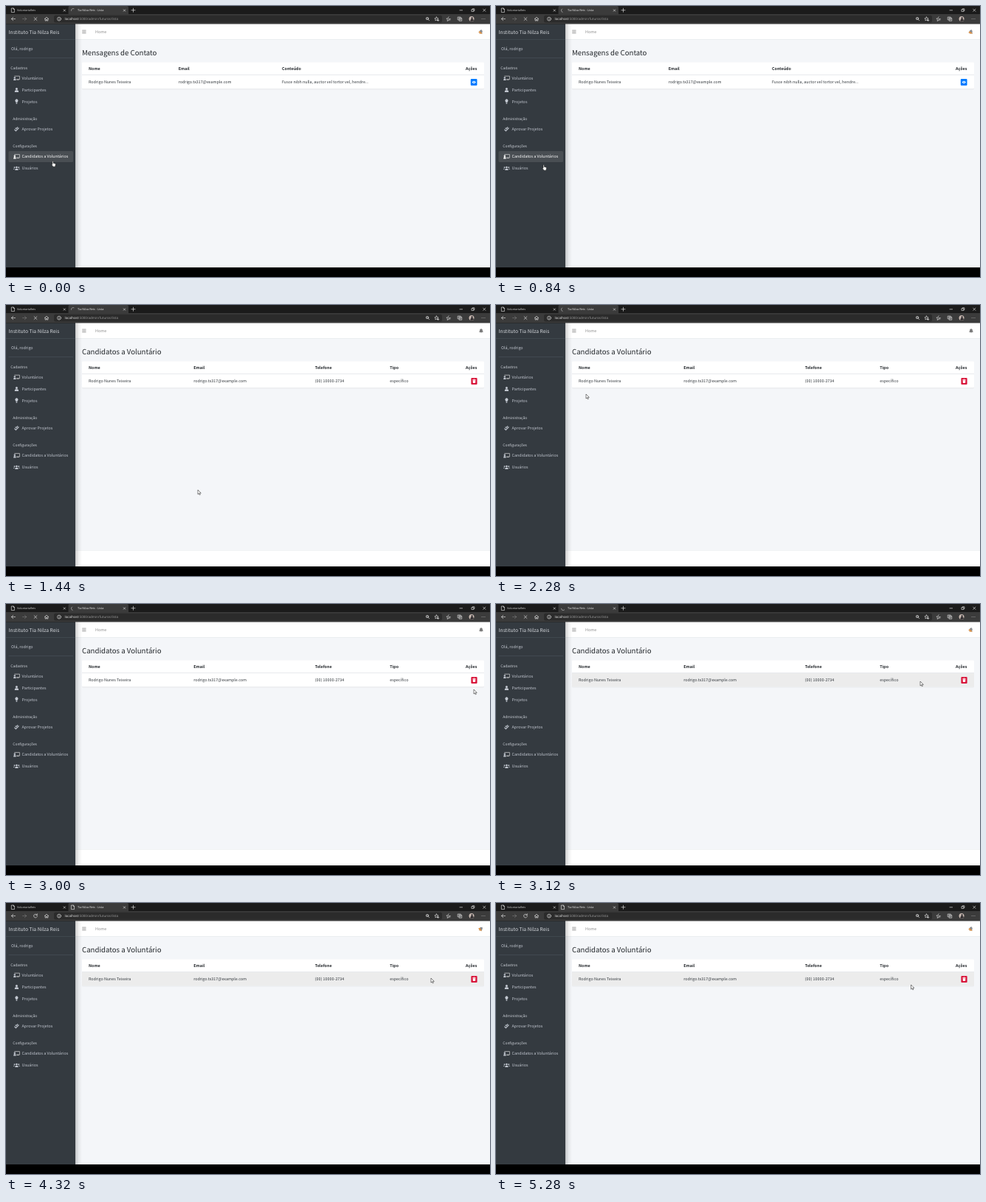
Recreate the animation shown at these times as an HTML page. Size 656x368 px, loop 5400 ms.

```html
<!DOCTYPE html>
<html lang="pt-BR">
<head>
<meta charset="utf-8">
<title>Candidatos a Voluntário</title>
<style>
html, body { margin: 0; width: 100%; height: 100%; overflow: hidden; background: #000; }
svg { display: block; width: 656px; height: 368px; }
text { text-rendering: geometricPrecision; white-space: pre; }
.page { font-family: "Noto Sans CJK JP", "Noto Sans CJK SC", "Noto Sans CJK", "Open Sans", sans-serif; }
.ui { font-family: "Open Sans", "Noto Sans", sans-serif; }
.line { fill: none; stroke: #e2e2e2; stroke-width: .65; stroke-linecap: round; stroke-linejoin: round; }
</style>
</head>
<body>
<svg id="stage" viewBox="0 0 656 368" xmlns="http://www.w3.org/2000/svg"></svg>
<script>
const STEP = 120, LOOP = 5400;

const rect = (x, y, w, h, fill, more = '') =>
  `<rect x="${x}" y="${y}" width="${w}" height="${h}" fill="${fill}" ${more}/>`;
const path = (d, more = 'class="line"') => `<path d="${d}" ${more}/>`;
const circle = (x, y, r, more = 'class="line"') => `<circle cx="${x}" cy="${y}" r="${r}" ${more}/>`;
const group = (id, body, more = '') => `<g id="${id}" ${more}>${body}</g>`;
const at = (x, y, body) => `<g transform="translate(${x} ${y})">${body}</g>`;
const label = (x, y, s, size, fill, more = 'class="page"') =>
  `<text x="${x}" y="${y}" font-size="${size}" fill="${fill}" ${more}>${s}</text>`;
const ui = (x, y, s, size, fill) => label(x, y, s, size, fill, 'class="ui"');
const bold = (x, y, s) => label(x, y, s, 5.4, '#212529', 'class="page" font-weight="700"');
const cell = (x, s) => label(x, 104.9, s, 5.38, '#33383d');
const cross = (x, y, r) => path(`M${x - r} ${y - r}l${2 * r} ${2 * r}m0 ${-2 * r}l${-2 * r} ${2 * r}`);
const doc = (x, y) => path(`M${x} ${y}h2.3l1.4 1.4v4.2h-3.7zm2.3 0v1.4h1.4`);

// Browser frame
function browser() {
  return rect(0, 0, 656, 12, '#1b1b1b') +
    rect(0, 11, 656, 13.5, '#3b3b3b') +
    path('M84.5 11.5V2q0-2 2-2h77.5q2 0 2 2v9.5z', 'fill="#3b3b3b"') +
    doc(7.7, 3) + ui(15, 7.3, 'VoluntariaReis', 3.75, '#d6d6d6') + cross(79.3, 6, 1.2) +
    ui(97, 7.3, 'Tia Nilza Reis - Lista', 3.9, '#f0f0f0') + cross(160.5, 6, 1.2) +
    path('M170 5.7h5m-2.5-2.5v5') +
    path('M615 5.8h3.6M631.3 4.7h2.7v2.7h-2.7zm.9 0v-.9h2.7v2.7h-.9') + cross(648.3, 5.7, 1.6) +
    path('M12.5 17.5H7.4m2.3-2.3l-2.3 2.3 2.3 2.3') +
    path('M22.5 17.5h5.1m-2.3-2.3l2.3 2.3-2.3 2.3', 'class="line" opacity=".35"') +
    path('M52.3 17.6l2.7-2.5 2.7 2.5m-4.6-.5v3h1.3v-1.8h1.2v1.8h1.3v-3') +
    rect(65, 12.7, 526, 9.8, '#2b2b2b', 'rx="2"') +
    circle(72, 17.6, 2.5) + path('M72 17.4v1.5m0-2.8v.1') +
    ui(79.5, 19.2, 'localhost<tspan fill="#a0a0a0">:5000/admin/futuros/lista</tspan>', 4.5, '#f2f2f2') +
    circle(571, 17, 1.7) + path('M572.3 18.3l1.4 1.4M570.2 17h1.6') +
    path('M583.5 14.9l.8 1.7 1.8.2-1.3 1.2.3 1.8-1.6-.9-1.6.9.3-1.8-1.3-1.2 1.8-.2zm2.2 3.3v2.4m-1.2-1.2h2.4') +
    path('M600 14.8l-1.1 2-2 .3 1.5 1.4-.3 1.9 1.9-1m-.2-1.8h2.6m-2.2 1.4h1.8') +
    path('M612.6 15h3.7v3.7h-3.7zm1.5 3.7v1.5h3.7v-3.7h-1.5m-1.8-.7v1.7m-.9-.8h1.8') +
    circle(631, 17.4, 3.5, 'fill="#c9b9b2"') +
    circle(631.6, 16.5, 1.2, 'fill="#29272a"') + path('M629.2 20.4q.2-3 2.4-3t2.3 2.3q-1.9 1.8-4.7.7z', 'fill="#29272a"') +
    [645, 647, 649].map(x => circle(x, 17.5, .45, 'fill="#ddd"')).join('');
}

// Sidebar icons, centred on 0,0
const icons = {
  board: path('M-2.7-2.8h6.7v4.5h-4.2') + circle(-2.6, -.6, 1.2, 'fill="currentColor"') +
    path('M-4.3 3q0-2.3 1.7-2.3t1.9 2.3z', 'fill="currentColor"') + path('M.8 2.1h2'),
  user: circle(0, -1.5, 1.5, 'fill="currentColor"') + path('M-2.6 3V2q0-1.7 1.7-1.7H.9Q2.6.3 2.6 2v1z', 'fill="currentColor"'),
  bulb: path('M-1 1.3Q-1.1.4-1.8-.4A2.1 2.1 0 1 1 1.8-.4Q1.1.4 1 1.3zm.1.5H.9v.7L.4 3.1H-.4l-.5-.6z', 'fill="currentColor"'),
  checks: path('M-3 .4l1.9 1.9L3-1.8M-1.8-1.6l1 1L1.6-2.9', 'fill="none" stroke="currentColor" stroke-width="1.1"'),
  users: circle(0, -1.3, 1.3, 'fill="currentColor"') + circle(-2.9, -1.2, .9, 'fill="currentColor"') +
    circle(2.9, -1.2, .9, 'fill="currentColor"') +
    path('M-2.3 2.7q0-2.4 2.3-2.4t2.3 2.4zM-4.4 1.6q0-1.5 1.9-1.5-.6.6-.8 1.5zM4.4 1.6Q4.4.1 2.5.1q.6.6.8 1.5z', 'fill="currentColor"')
};
const item = (y, icon, s, color = '#c2c7d0') =>
  `<g color="${color}">${at(14.4, y, icons[icon])}${label(21.6, y + 2, s, 5.38, color)}</g>`;

function sidebar() {
  const head = (x, y, s) => label(x, y, s, 4.9, '#d0d4db');
  return rect(94, 24.5, 9, 330.5, 'url(#shade)') +
    rect(0, 24.5, 94, 330.5, '#343a40') +
    label(3.6, 37.6, 'Instituto Tia Nilza Reis', 6.7, '#d3d6da', 'class="page" font-weight="300"') +
    rect(0, 45, 94, .5, '#4b545c') +
    label(7, 60.2, 'Olá, rodrigo', 5.38, '#c2c7d0') +
    rect(3.5, 70, 87.5, .5, '#4f5962') +
    head(6.3, 85.8, 'Cadastros') +
    item(98, 'board', 'Voluntários') + item(114, 'user', 'Participantes') + item(130, 'bulb', 'Projetos') +
    head(9.3, 154.8, 'Administração') + item(167.3, 'checks', 'Aprovar Projetos') +
    head(9.3, 191.8, 'Configurações') +
    group('hover', rect(3.5, 197, 87.5, 15, '#494e53', 'rx="1.5"') + item(204.4, 'board', 'Candidatos a Voluntários', '#fff')) +
    group('plain', item(204.4, 'board', 'Candidatos a Voluntários')) +
    item(220.4, 'users', 'Usuários');
}

// One table page: columns are [x, heading, value]
function table(id, title, cols, button) {
  return group(id,
    label(103, 67.4, title, 9.65, '#212529') +
    rect(103, 76.2, 545, 36, '#fff', 'rx="1" filter="url(#card)"') +
    (id === 'people' ? group('rowHover', rect(103, 94, 545, 18.2, '#ececec')) : '') +
    rect(103, 93.3, 545, .75, '#dee2e6') +
    cols.map(([x, h, v]) => bold(x, 86.7, h) + cell(x, v)).join('') +
    bold(623, 86.7, 'Ações') + button);
}

const name = 'Rodrigo Nunes Teixeira', mail = 'rodrigo.tx317@example.com';
const eye = rect(629.8, 99, 8.7, 9, '#007bff', 'rx="1"') +
  path('M631.5 103.5q2.7-3.6 5.4 0-2.7 3.6-5.4 0z', 'fill="#fff"') + circle(634.2, 103.5, .8, 'fill="#007bff"');
const trash = rect(630.4, 99, 8.2, 9, '#d9143a', 'rx="1"') +
  path('M632.3 101.1h1.3l.4-.5h1l.4.5h1.3v.7h-4.4zm.3 1.1h3.8l-.3 3.9h-3.2z', 'fill="#fff"');
const bell = 'M0-3q.5 0 .5.6Q2-2 2-.3 2 .9 2.6 1.6v.5h-5.2v-.5Q-2 .9-2-.3-2-2-.5-2.4q0-.6.5-.6zM-.8 2.5H.8Q.6 3.2 0 3.2t-.8-.7z';

const stage = document.getElementById('stage');
stage.innerHTML = `<defs>
  <linearGradient id="shade"><stop stop-color="#000" stop-opacity=".2"/><stop offset=".5" stop-color="#000" stop-opacity=".06"/><stop offset="1" stop-color="#000" stop-opacity="0"/></linearGradient>
  <filter id="card" x="-2%" y="-20%" width="104%" height="150%"><feDropShadow dx="0" dy=".4" stdDeviation=".6" flood-opacity=".22"/></filter>
  </defs>` +
  rect(0, 0, 656, 368, '#000') +
  rect(94, 24, 562, 331, '#f4f6f9') +
  rect(94, 24, 562, 21, '#fff') + rect(94, 45, 562, .5, '#dee2e6') +
  path('M103.2 33.1h5.3m-5.3 1.9h5.3m-5.3 1.9h5.3', 'stroke="#858585" stroke-width=".75"') +
  label(121, 37.1, 'Home', 5.38, '#8b8b8b') +
  group('bellIdle', path(bell, 'fill="#7d7d7d"'), 'transform="translate(644 35)"') +
  group('bellRing', path(bell, 'fill="#8b8d91"') + path('M-2.6 2.1v-.5Q-2 .9-2-.3L2.2 1.1l.4.5v.5zM-.8 2.5H.8Q.6 3.2 0 3.2t-.8-.7z', 'fill="#e9923a"')) +
  table('messages', 'Mensagens de Contato', [
    [112, 'Nome', name], [233.7, 'Email', mail],
    [374, 'Conteúdo', 'Fusce nibh nulla, auctor vel tortor vel, hendre...']
  ], eye) +
  table('people', 'Candidatos a Voluntário', [
    [112, 'Nome', name], [254.2, 'Email', mail],
    [418.8, 'Telefone', '(00) 10000-2734'], [520.3, 'Tipo', 'específico']
  ], trash) +
  group('footer', rect(94, 333, 562, 22, '#fff') + rect(94, 333, 562, .4, '#dee2e6')) +
  sidebar() + browser() +
  group('loading', cross(40, 17.6, 1.9)) +
  group('spinner', path('M-2.5.4A2.5 2.5 0 0 1 1-2.3', 'class="line" opacity=".75"')) +
  group('loaded', doc(88.8, 3) + path('M42 16.2a2.4 2.4 0 1 0 .4 1.6M42.3 14.7v1.7h-1.7')) +
  group('arrow', path('M0 0V6.1L1.4 4.8 2.3 6.9 3.3 6.5 2.4 4.4H4.3Z', 'fill="#fff" stroke="#222" stroke-width=".55"')) +
  group('hand', path('M1.3.8q.7-.8 1.3 0V3.3l2.5.7q.9.3.7 1.2L5.2 8.2H2.3L.2 5.4q.2-.8 1.1-.1z', 'fill="#fff" stroke="#111" stroke-width=".55"'));

const parts = {};
stage.querySelectorAll('g[id]').forEach(g => parts[g.id] = g);
const show = (id, on) => parts[id].style.display = on ? '' : 'none';
const place = (id, x, y, turn = 0) => parts[id].setAttribute('transform', `translate(${x} ${y}) rotate(${turn})`);

// Pointer stops: [step, x, y]
const stops = [
  [0, 61.5, 210], [2, 62, 211], [5, 62.5, 215], [8, 62.8, 215], [9, 110, 228], [10, 190, 243],
  [11, 245, 250], [12, 260, 251], [13, 250, 238], [15, 190, 184], [18, 124, 122], [19, 122, 121],
  [20, 122, 121], [21, 180, 140], [22, 330, 160], [23, 500, 150], [24, 600, 128], [25, 634, 116],
  [26, 575, 105], [27, 576, 102], [43, 576, 102], [44, 562.5, 111]
];
function pointer(k) {
  const i = stops.findIndex(s => s[0] >= k);
  const [k1, x1, y1] = stops[i], [k0, x0, y0] = stops[Math.max(0, i - 1)];
  const p = k1 > k0 ? (k - k0) / (k1 - k0) : 1;
  return [x0 + (x1 - x0) * p, y0 + (y1 - y0) * p];
}

const LISTED = 9, ALERT = 26, READY = 28;
function ringing(k) {
  const n = k < LISTED ? k - 1 : k - 31;
  return n > 0 && n < 11 ? (n % 2 ? 28 : -14) * (1 - n / 16) : 0;
}

function draw(k) {
  const first = k < LISTED, alert = first || k >= ALERT, ready = k >= READY;
  show('messages', first);
  show('people', !first);
  show('hover', first);
  show('plain', !first);
  show('footer', !first && !ready);
  show('rowHover', k >= ALERT);
  show('bellIdle', !alert);
  show('bellRing', alert);
  show('loading', !ready);
  show('spinner', !ready);
  show('loaded', ready);
  show('hand', first);
  show('arrow', !first);
  place('bellRing', 643.6, 35, 24 + ringing(k));
  place('spinner', 91, 6, -60 * k);
  place(first ? 'hand' : 'arrow', ...pointer(k));
}

const start = performance.now();
function tick() {
  draw(Math.floor((performance.now() - start) % LOOP / STEP));
  requestAnimationFrame(tick);
}
tick();
</script>
</body>
</html>
```
